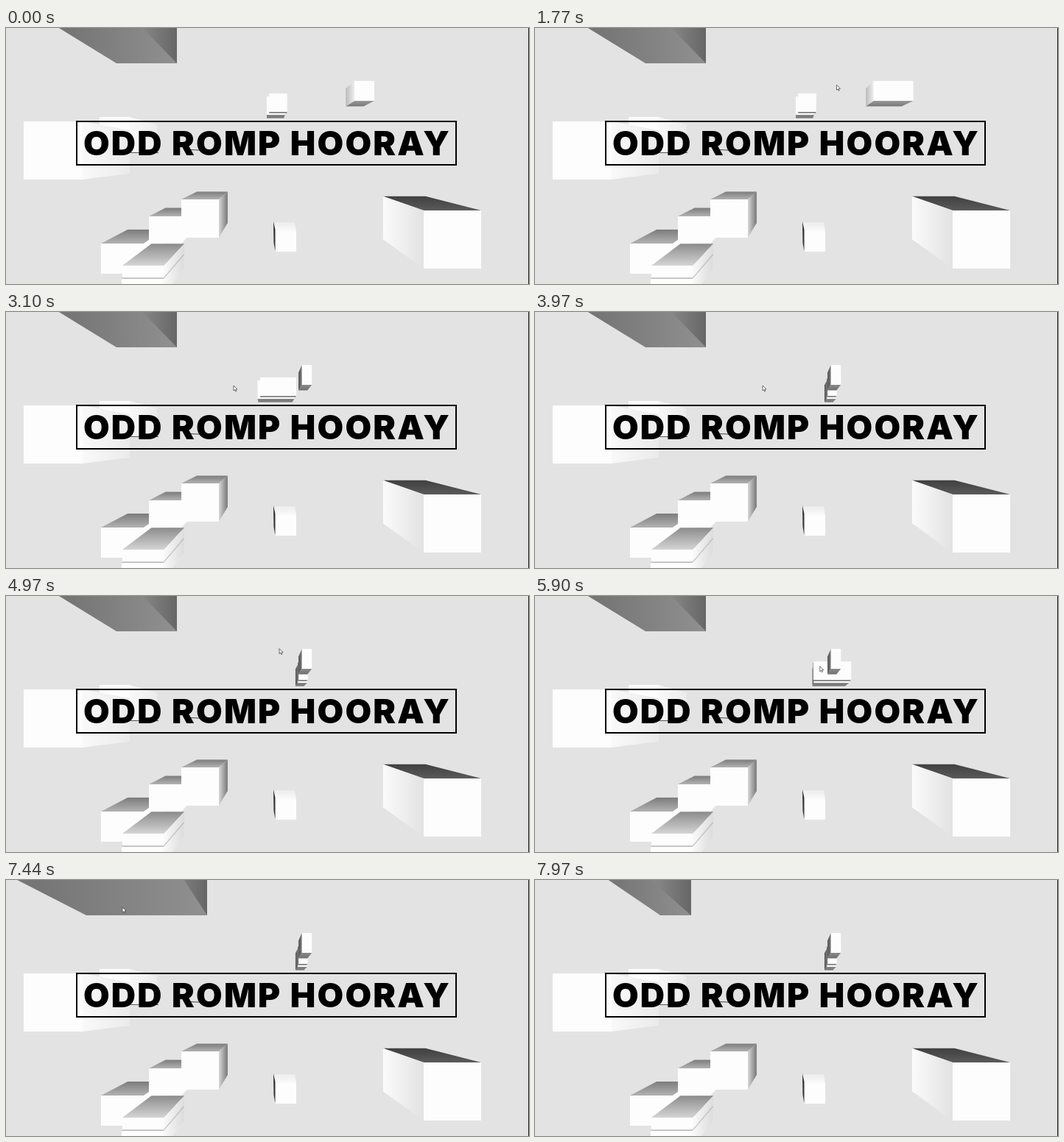
An HTML page with a canvas that plays this animation: 710x348 px, repeating every 8 s.

```html
<!DOCTYPE html>
<html lang="en">
<head>
<meta charset="utf-8">
<title>Odd Romp Hooray</title>
<style>
html, body { margin: 0; width: 100%; height: 100%; overflow: hidden; background: #e3e3e3; }
canvas { display: block; }
</style>
</head>
<body>
<canvas id="stage" width="710" height="348"></canvas>
<script>
const ctx = document.getElementById('stage').getContext('2d');
const LOOP = 8000;
const VANISH = { x: 355, y: 174 };

// The pointer eases from stop to stop, one stop per beat.
const POINTER_START = 500, POINTER_HIDE = 7850, BEAT = 867;
const POINTER_STOPS = [
  [537, 53], [440, 75], [372, 80], [309, 100], [309, 100],
  [367, 69], [428, 108], [120, 15], [158, 37], [200, 110]
];

const mix = (a, b, k) => a + (b - a) * k;
const smooth = k => k * k * (3 - 2 * k);
const toward = ([x, y], depth) => [mix(VANISH.x, x, depth), mix(VANISH.y, y, depth)];
const spring = ms => 1 - Math.exp(-0.0107 * ms) * Math.cos(0.0126 * ms);

// Times alternate between touch (double width) and release (half width).
// The first release also shifts the box sideways.
function poseAt(time, touches, offset = 0) {
  let scale = 1, shift = 0;
  touches.forEach((start, i) => {
    if (time < start) return;
    const k = spring(time - start);
    scale = mix(scale, i % 2 ? 0.5 : 2, k);
    if (i === 1) shift = offset * k;
  });
  return { scale, shift };
}

function shade(x0, y0, x1, y1, from, to) {
  const gradient = ctx.createLinearGradient(x0, y0, x1, y1);
  gradient.addColorStop(0, from);
  gradient.addColorStop(1, to);
  return gradient;
}

function trace(points) {
  ctx.beginPath();
  points.forEach(p => ctx.lineTo(...p));
}

function poly(fill, ...points) {
  ctx.fillStyle = fill;
  trace(points);
  ctx.fill();
}

function line(color, ...points) {
  ctx.strokeStyle = color;
  ctx.lineWidth = 1;
  trace(points);
  ctx.stroke();
}

// A box in one-point perspective; each side is shaded from near to far.
function box(x, y, width, height, depth, { level, side }) {
  const right = x + width, bottom = y + height;
  const tl = [x, y], tr = [right, y], bl = [x, bottom], br = [right, bottom];
  const face = (a, b, fill) => poly(fill, a, b, toward(b, depth), toward(a, depth));
  const levelFace = (a, b) => face(a, b, shade(0, a[1], 0, toward(a, depth)[1], ...level));
  const sideFace = (a, b) => face(a, b, shade(a[0], 0, toward(a, depth)[0], 0, ...side));
  if (y > VANISH.y) levelFace(tl, tr);
  if (bottom < VANISH.y) levelFace(bl, br);
  if (x > VANISH.x) sideFace(tl, bl);
  if (right < VANISH.x) sideFace(tr, br);
  poly('#fdfdfd', tl, tr, br, bl);
}

function movingBox({ scale, shift }, center, y, width, height, depth, colors) {
  const w = width * scale;
  box(center + shift - w / 2, y, w, height, depth, colors);
}

// Its front is above the stage, so only the underside and right side show.
function drawTopBox({ scale }) {
  const y = 48, left = 191 - 41 * scale, right = 191 + 41 * scale;
  const atStageTop = x => [mix(VANISH.x, x, VANISH.y / (VANISH.y - y)), 0];
  poly(shade(left - 60, 0, right, 0, '#767676', '#909090'),
    atStageTop(left), [left, y], [right, y], [right, 0]);
  poly(shade(right - 45, 0, right, 0, '#858585', '#666'),
    atStageTop(right), [right, y], [right, 0]);
}

function drawStillBoxes() {
  const white = { level: ['#777', '#555'], side: ['#f9f9f9', '#ebebeb'] };
  const step = { level: ['#b2b2b2', '#7c7c7c'], side: ['#fdfdfd', '#f4f4f4'] };
  const slab = { level: ['#d4d4d4', '#8c8c8c'], side: ['#fafafa', '#dcdcdc'] };

  box(127, 121, 41, 48, 0.8, white);
  box(24, 127, 80, 79, 0.745, white);
  line('#555', [170, 169.5], [207, 169.5]);
  line('#444', [250, 165.5], [272, 166.5]);

  box(129, 293, 58, 41, 0.84, step);
  box(194, 256, 44, 37, 0.86, step);
  box(238, 233, 51, 52, 0.82, { ...step, side: ['#d8d8d8', '#777'] });
  box(157, 341, 56, 25, 0.8, slab);
  box(158, 323, 56, 16, 0.8, slab);
  line('#bbb', [157, 340.5], [214, 340.5], [242, 308]);

  poly(shade(0, 264, 0, 278, '#ececec', '#fdfdfd'),
    [364, 264], [392, 264], [394, 276], [394, 304], [365, 304]);
  poly('#333', [363, 263], [365.5, 274], [365.5, 304], [363.5, 292]);

  box(567, 248, 78, 79, 0.74, { level: ['#5a5a5a', '#404040'], side: ['#e2e2e2', '#fbfbfb'] });
}

function drawTitle() {
  ctx.strokeStyle = ctx.fillStyle = '#000';
  ctx.lineWidth = 2;
  ctx.strokeRect(96, 127, 515, 59);
  ctx.font = '900 46px Inter, sans-serif';
  ctx.letterSpacing = '2.2px';
  ctx.textAlign = 'center';
  ctx.fillText('ODD ROMP HOORAY', 354.5, 173);
}

function drawPointer(time) {
  if (time < POINTER_START || time > POINTER_HIDE) return;
  const beats = (time - POINTER_START) / BEAT, i = Math.floor(beats);
  const k = smooth(beats - i), from = POINTER_STOPS[i], to = POINTER_STOPS[i + 1];
  ctx.save();
  ctx.translate(mix(from[0], to[0], k), mix(from[1], to[1], k));
  poly('#fff', [0, 0], [0, 7], [1.6, 5.7], [2.7, 8], [3.8, 7.5], [2.8, 5.2], [5, 5]);
  ctx.closePath();
  ctx.lineWidth = 0.7;
  ctx.strokeStyle = '#333';
  ctx.stroke();
  ctx.restore();
}

function draw(time) {
  const gray = { level: ['#8a8a8a', '#707070'], side: ['#777', '#555'] };
  const pale = { level: ['#999', '#777'], side: ['#eee', '#bbb'] };
  const rightPose = poseAt(time, [620, 2250], -78);
  const pairTouches = [2300, 3150, 5750, 6660];

  ctx.fillStyle = '#e3e3e3';
  ctx.fillRect(0, 0, 710, 348);
  drawTopBox(poseAt(time, [6596, 7500]));
  drawStillBoxes();
  movingBox(poseAt(time - 40, pairTouches, 36), 366.5, 93, 25, 25, 0.92, gray);
  movingBox(poseAt(time, pairTouches, 34), 369.5, 89, 24.5, 25, 0.97, gray);
  movingBox(rightPose, 486.5, 72, 27, 27, 0.9, rightPose.shift ? gray : pale);
  drawTitle();
  drawPointer(time);
  ctx.fillStyle = '#222';
  ctx.fillRect(709, 0, 1, 348);
}

const begin = performance.now();
function tick() {
  draw((performance.now() - begin) % LOOP);
  requestAnimationFrame(tick);
}
tick();
</script>
</body>
</html>
```
